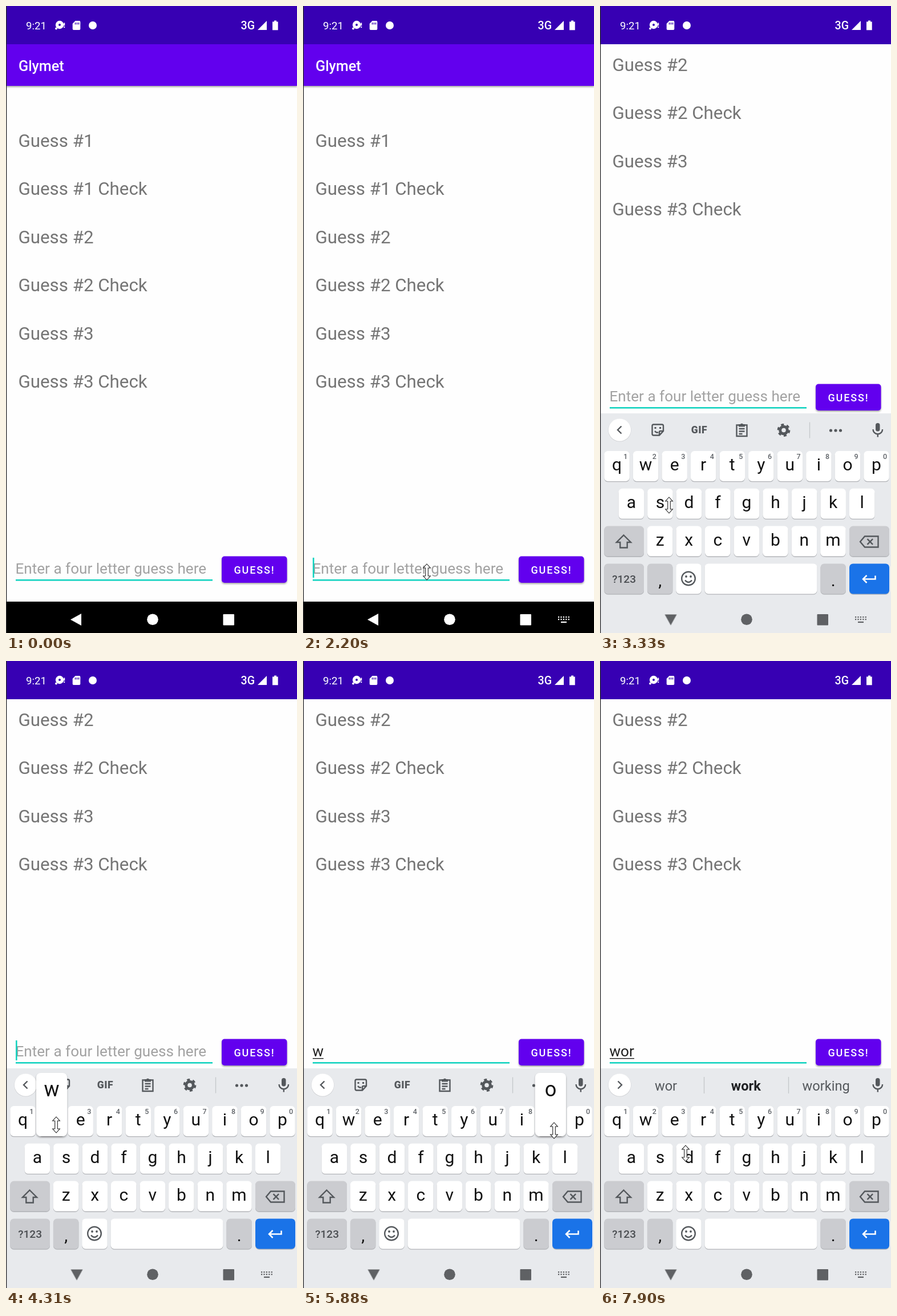
These frames come from a looping animation (510 by 1099 pixels, 8 s). An HTML page:

```html
<!DOCTYPE html>
<html lang="en">
<head>
<meta charset="utf-8">
<title>Four letter guess</title>
<style>
html, body { margin: 0; width: 100%; height: 100%; overflow: hidden; background: #fefefe; }
svg { display: block; width: 100vw; height: 100vh; font-family: Roboto, sans-serif; }
.mid { text-anchor: middle; }
.icon { fill: none; stroke: #54585c; stroke-width: 2.4; }
.solid { fill: #54585c; }
.step { animation: 8s step-end infinite; }
.move { animation: 8s linear infinite; }

/* 1% is 80 ms */
@keyframes pan {
  0% { transform: translateY(0); }
  30.875% { transform: translateY(-37px); }
  31.6% { transform: translateY(-197px); }
  32.5% { transform: translateY(-290px); }
  34.125%, 100% { transform: translateY(-302px); }
}
@keyframes rise {
  0% { transform: translateY(400px); }
  30.875% { transform: translateY(125px); }
  31.6% { transform: translateY(6px); }
  32.5%, 100% { transform: translateY(0); }
}
@keyframes tint {
  0% { color: #fff; }
  31.6% { color: #cdcfd2; }
  32.5% { color: #96999d; }
  34.125%, 100% { color: #5f6164; }
}
@keyframes turn {
  0%, 34.1% { transform: rotate(0); }
  36.5%, 100% { transform: rotate(-90deg); }
}
@keyframes switcher { 0% { opacity: 0; } 27.45%, 100% { opacity: 1; } }
@keyframes empty { 0% { opacity: 1; } 56.375%, 100% { opacity: 0; } }
@keyframes one { 0%, 73.625%, 100% { opacity: 0; } 56.375% { opacity: 1; } }
@keyframes two { 0%, 92.875%, 100% { opacity: 0; } 73.625% { opacity: 1; } }
@keyframes three { 0% { opacity: 0; } 92.875%, 100% { opacity: 1; } }
@keyframes tools { 0% { opacity: 1; } 73.625%, 100% { opacity: 0; } }
@keyframes pressW { 0%, 56.375%, 100% { opacity: 0; } 53.875% { opacity: 1; } }
@keyframes pressO { 0%, 73.625%, 100% { opacity: 0; } 71.875% { opacity: 1; } }
@keyframes pressR { 0%, 92.875%, 100% { opacity: 0; } 90.25% { opacity: 1; } }
@keyframes blink {
  0%, 7.125%, 19%, 31.25%, 41.6%, 54.125%, 62.625%, 76.875%, 88.875%, 98.7%, 100% { opacity: 0; }
  .875%, 12.5%, 25%, 35.875%, 47.875%, 56.375%, 73.625%, 82.5%, 92.875% { opacity: 1; }
}
@keyframes advance {
  0% { transform: translateX(0); }
  56.375% { transform: translateX(19px); }
  73.625% { transform: translateX(33.6px); }
  92.875%, 100% { transform: translateX(42.5px); }
}
@keyframes pointer {
  0%, 3.87% { transform: translate(395px, 1074px); opacity: 0; }
  3.875% { transform: translate(395px, 1074px); opacity: 1; }
  9.875%, 16.5% { transform: translate(343px, 1032px); }
  25%, 35.5% { transform: translate(217px, 992px); }
  41.625% { transform: translate(121px, 875px); }
  45.125%, 46% { transform: translate(111px, 844px); }
  50.25%, 56.375% { transform: translate(88px, 813px); }
  61.375% { transform: translate(227px, 810px); }
  66.375%, 67% { transform: translate(449px, 819px); }
  70.125%, 74% { transform: translate(440px, 823px); }
  81.75%, 83% { transform: translate(150px, 805px); }
  89%, 93.5% { transform: translate(180px, 818px); }
  98.75%, 100% { transform: translate(150px, 863px); opacity: 1; }
}
</style>
</head>
<body>
<svg viewBox="0 0 510 1099" preserveAspectRatio="none">
  <defs>
    <filter id="lift" x="-20%" y="-20%" width="140%" height="150%">
      <feDropShadow dx="0" dy="2" stdDeviation="1.6" flood-opacity=".35"/>
    </filter>
  </defs>
  <rect width="510" height="1099" fill="#fefefe"/>

  <!-- app window -->
  <g class="step" style="animation-name:pan">
    <rect y="67" width="510" height="73" fill="#6200ee" filter="url(#lift)"/>
    <text x="22" y="113.5" font-size="25.2" font-weight="500" fill="#fff">Glymet</text>
    <g id="rows" font-size="31.3" fill="#757575"></g>
    <g font-size="26.1">
      <text class="step" style="animation-name:empty" x="16.5" y="995" fill="#a2a2a2">Enter a four letter guess here</text>
      <g id="typed" fill="#212121"></g>
    </g>
    <rect x="17" y="1005" width="345" height="2.6" fill="#14d3c0"/>
    <g class="step" style="animation-name:advance">
      <rect class="step" style="animation-name:blink" x="17" y="967" width="2.6" height="35" fill="#14d3c0"/>
    </g>
    <rect x="378" y="964.5" width="114.5" height="46.5" rx="5" fill="#6200ee" filter="url(#lift)"/>
    <text x="399.5" y="995" font-size="18" font-weight="500" letter-spacing="1.85" fill="#fff">GUESS!</text>
  </g>

  <!-- status bar -->
  <rect width="510" height="67" fill="#3700b3"/>
  <g fill="#fff">
    <text x="35" y="41" font-size="18.6">9:21</text>
    <circle cx="94" cy="33" r="7.2"/>
    <circle cx="94" cy="33" r="2" fill="#3700b3"/>
    <circle cx="88" cy="39.5" r="1.9"/>
    <path d="M101.2 29.500h2v5h-2zM101.200 36h2v2h-2z"/>
    <path d="M121.500 26H128.500Q130.300 26 130.300 28V40Q130.300 42 128.500 42H118.500Q116.700 42 116.700 40V31Z"/>
    <path d="M121.500 29v3.500M124.500 29v3.500M127.500 29v3.500" stroke="#3700b3" stroke-width="1.4"/>
    <circle cx="152" cy="34" r="7"/>
    <text x="411.500" y="41" font-size="19.6" font-weight="500" font-weight="400">3G</text>
    <path d="M441 42H457V26Z"/>
    <path d="M470 25.500h4v2h2.700v14.700h-9.700V27.500h3z"/>
  </g>

  <rect y="1044" width="510" height="55" fill="#000"/>

  <!-- keyboard -->
  <g class="step" style="animation-name:rise">
    <rect y="714" width="510" height="400" fill="#e8eaed"/>
    <circle cx="34.500" cy="743.500" r="20" fill="#c8cacd"/>
    <circle cx="34.500" cy="743" r="19.700" fill="#fff"/>
    <g class="step" style="animation-name:tools">
      <path class="icon" d="M37.500 736.500L31 743L37.500 749.500"/>
      <path class="icon" d="M94 733.500H108.500Q111 733.500 111 736V745L104 752.500H94Q91.500 752.500 91.500 750V736Q91.500 733.500 94 733.500ZM111 745H106Q104 745 104 747V752.500M96 745Q99 749 102 747"/>
      <path class="solid" d="M95.500 738h3v3h-3zM104 738h3v3h-3z"/>
      <text class="mid solid" x="174" y="749" font-size="17.500" font-weight="900" letter-spacing=".6">GIF</text>
      <path class="icon" d="M240 734.500H257.500V754H239.500V734.500ZM243.500 741h10M243.500 745.500h10M243.500 750h6"/>
      <path class="solid" d="M243 733h3a3 3 0 0 1 5 0h3v4.500h-11z"/>
      <circle class="icon" cx="322" cy="743.500" r="6.300" style="stroke-width:5"/>
      <circle class="icon" cx="322" cy="743.500" r="9.600" style="stroke-width:3.600;stroke-dasharray:5 5.053"/>
      <path d="M367.500 729.500V757.500" stroke="#c4c6ca" stroke-width="1.300"/>
      <g class="solid"><circle cx="404.500" cy="744" r="2.600"/><circle cx="413" cy="744" r="2.600"/><circle cx="421.500" cy="744" r="2.600"/></g>
    </g>
    <g class="step" style="animation-name:two"><g class="tips"></g></g>
    <g class="step" style="animation-name:three"><g class="tips"></g></g>
    <rect class="solid" x="483" y="731" width="7.500" height="14.500" rx="3.750"/>
    <path class="icon" d="M478.500 742a8.300 8.300 0 0 0 16.600 0M486.800 750v5.500"/>

    <g id="keys"></g>
    <path class="icon" d="M41.500 927.500L54 940H47.700V949.500H35.300V940H29Z"/>
    <path class="icon" d="M464 929.500H487.500V948.500H464L456 939ZM468.500 934.200l9.600 9.600M478.100 934.200l-9.600 9.600"/>
    <circle class="icon" cx="155" cy="1003.500" r="11.800"/>
    <path class="icon" d="M149 1006.500Q155 1013.500 161 1006.500"/>
    <g class="solid"><circle cx="151" cy="1000" r="1.900"/><circle cx="159" cy="1000" r="1.900"/></g>
    <path d="M482.500 998.500V1004.500H461M467.500 998L461 1004.500L467.500 1011" fill="none" stroke="#fff" stroke-width="2.500"/>
    <g id="popups"></g>
  </g>

  <!-- navigation -->
  <g class="step" style="animation-name:tint" fill="currentColor">
    <path class="move" style="animation-name:turn;transform-origin:123.500px 1075px" d="M113 1075.500L132 1065V1086Z"/>
    <circle cx="257" cy="1075.300" r="9.800"/>
    <rect x="380.500" y="1066" width="19.500" height="19.500" rx="1"/>
    <g class="step" style="animation-name:switcher" stroke="currentColor" stroke-width="2.200">
      <path d="M447 1071.200H467M447 1075.200H467" stroke-dasharray="2.200 2.200"/>
      <path d="M452 1080H462"/>
    </g>
  </g>

  <rect width="1.300" height="1099" fill="#2b2b2e"/>

  <!-- mouse pointer -->
  <path class="move" style="animation-name:pointer" d="M0 -14L6.300 -7H2.300V7H6.300L0 14L-6.300 7H-2.300V-7H-6.300Z" fill="#fff" stroke="#222" stroke-width="1.100"/>
</svg>

<script>
const NS = 'http://www.w3.org/2000/svg';
const find = id => document.getElementById(id);

function add(parent, tag, attrs, content = '') {
  const el = document.createElementNS(NS, tag);
  for (const name in attrs) el.setAttribute(name, attrs[name]);
  el.textContent = content;
  parent.appendChild(el);
  return el;
}

function timed(parent, name) {
  return add(parent, 'g', { class: 'step', style: `animation-name:${name}` });
}

for (let i = 0; i < 6; i++) {
  const label = `Guess #${(i >> 1) + 1}${i % 2 ? ' Check' : ''}`;
  add(find('rows'), 'text', { x: 21.4, y: 247 + 84.4 * i }, label);
}

[['one', 'w', 19], ['two', 'wo', 34], ['three', 'wor', 43]].forEach(([name, word, width]) => {
  const g = timed(find('typed'), name);
  add(g, 'text', { x: 16.5, y: 995 }, word);
  add(g, 'rect', { x: 17, y: 998, width, height: 1.4 });
});

const tips = [['wo', 'so', 'wow'], ['wor', 'work', 'working']];
document.querySelectorAll('.tips').forEach((g, n) => {
  add(g, 'path', { class: 'icon', d: 'M31.500 736.500L38 743L31.500 749.500' });
  for (const x of [182.5, 330.5])
    add(g, 'path', { d: `M${x} 729V758`, stroke: '#c4c6ca', 'stroke-width': 1.3 });
  tips[n].forEach((word, i) => {
    const best = word === 'work';
    add(g, 'text', {
      class: 'mid', x: 115.5 + 140.3 * i, y: 752.5, 'font-size': 23.6,
      fill: best ? '#202124' : '#54585c', 'font-weight': best ? 700 : 400
    }, word);
  });
});

const keys = find('keys');
const GREY = '#cbccd0';

function key(x, y, width, fill = '#fff', label = '', size = 30, drop = 34) {
  const box = { x, width, height: 53, rx: 6.5 };
  add(keys, 'rect', { ...box, y: y + 1.3, fill: '#b2b4b8' });
  add(keys, 'rect', { ...box, y, fill });
  if (label) add(keys, 'text', {
    class: 'mid', x: x + width / 2, y: y + drop, 'font-size': size,
    fill: size < 25 ? '#4a4d51' : '#111', 'font-weight': size < 25 ? 500 : 400
  }, label);
}

const PITCH = 50.55;
[['qwertyuiop', 7.3], ['asdfghjkl', 32.6], ['zxcvbnm', 82.9]].forEach(([row, left], r) => {
  [...row].forEach((letter, i) => key(left + PITCH * i, 780 + 65.8 * r, 44.5, '#fff', letter));
});
for (let i = 0; i < 10; i++)
  add(keys, 'text', {
    class: 'mid', x: 44.7 + PITCH * i, y: 794, 'font-size': 12.5, 'font-weight': 500, fill: '#5f6368'
  }, (i + 1) % 10);

key(7.3, 911.6, 69.7, GREY);
key(437, 911.6, 70, GREY);
key(7.3, 977.4, 69.7, GREY, '?123', 19, 33.5);
key(82.9, 977.4, 44.5, GREY, ',', 30, 40);
key(133.2, 977.4, 44.5);
key(183.5, 977.4, 197);
key(386.5, 977.4, 44.5, GREY, '.', 30, 40);
key(437, 977.4, 70, '#1a73e8');

[['pressW', 'w', 1], ['pressO', 'o', 8], ['pressR', 'r', 3]].forEach(([name, letter, i]) => {
  const g = timed(find('popups'), name);
  const x = 29.5 + PITCH * i;
  add(g, 'rect', { x: x - 27, y: 722, width: 54, height: 111, rx: 8, fill: '#fff', filter: 'url(#lift)' });
  add(g, 'text', { class: 'mid', x, y: 763, 'font-size': 36, fill: '#111' }, letter);
});
</script>
</body>
</html>
```
